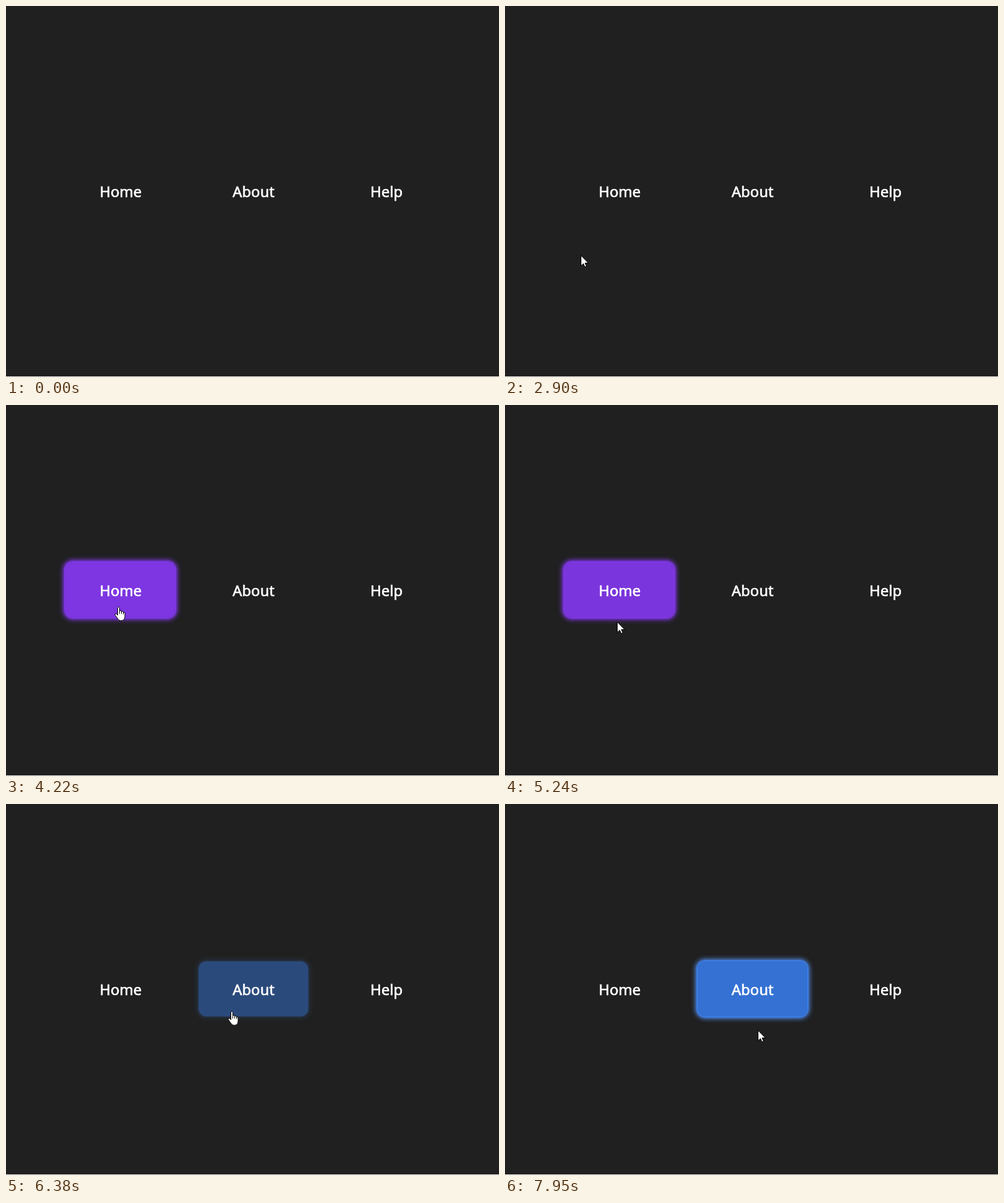
An HTML page for the animation above (8000 ms loop, 788x594 px).

```html
<!DOCTYPE html>
<html lang="en">
<head>
<meta charset="utf-8">
<title>Hover menu</title>
<style>
  html, body { margin: 0; width: 100%; height: 100%; overflow: hidden; background: #202020; }
  body { position: relative; }
  .item {
    position: absolute; top: 252px; width: 175px; height: 88px; border-radius: 12px;
    font: 23.5px/88px "Noto Sans", "Open Sans", sans-serif; letter-spacing: .1px;
    text-align: center; color: #fff; -webkit-text-stroke: .7px #fff;
  }
  .item span { position: relative; left: .8px; top: 1px; }
  #edge { position: absolute; left: 0; top: 593px; width: 788px; height: 1px; background: #e8e8e8; }
  svg { position: absolute; left: 0; top: 0; }
  #pointer path { stroke: #000; stroke-linejoin: round; fill: #fff; }
</style>
</head>
<body>
<div class="item" style="left:95px"><span>Home</span></div>
<div class="item" style="left:307.5px"><span>About</span></div>
<div class="item" style="left:520px"><span>Help</span></div>
<div id="edge"></div>
<svg width="788" height="594">
  <g id="pointer">
    <path id="arrow" d="M0 0V16.5L3.8 13 6.2 18.3 8.7 17.2 6.4 12H11.6Z"/>
    <g id="hand" transform="translate(-6 0)">
      <path d="M5 2Q6.5-.8 8 2V7.5Q9.5 5.8 11 7.5V8.5Q12.5 7 14 8.7V9.5Q16.5 8.8 16.5 11V16Q16.5 22.8 10 22.8 7 22.8 5 19.5L1 14Q-.2 11 2.5 11.5L5 14Z"/>
      <path d="M8 7.5V12M11 8V12M14 9.5V12.5" style="fill:none"/>
    </g>
  </g>
</svg>
<script>
const LOOP = 8000, FADE = 700;
const [home, about] = document.querySelectorAll('.item');
const pointer = document.getElementById('pointer');
const arrow = document.getElementById('arrow');
const hand = document.getElementById('hand');

const hovers = [
  { item: home, enter: 3725, leave: 5180, fill: '131,56,236', glow: '131,56,236' },
  { item: about, enter: 6205, leave: 7843, fill: '58,134,255', glow: '90,153,255' }
];

// Each move bends toward a control point and starts where the previous one ended.
const origin = [22, 592];
const moves = [
  { from: 1400, to: 1880, bend: [59, 545], end: [96, 499] },
  { from: 2280, to: 3040, bend: [80, 408], end: [142, 390] },
  { from: 3110, to: 3880, bend: [165, 370], end: [180, 322] },
  { from: 4750, to: 5500, bend: [161, 349], end: [200, 353] },
  { from: 5570, to: 6310, bend: [353, 362], end: [361, 331] },
  { from: 6380, to: 6800, bend: [367, 325], end: [373, 320] },
  { from: 7680, to: 7950, bend: [388, 332], end: [405, 362] }
];

const clamp = v => Math.min(1, Math.max(0, v));
const smooth = (a, b, v) => { const u = clamp((v - a) / (b - a)); return u * u * (3 - 2 * u); };

// CSS "ease": cubic-bezier(.25, .1, .25, 1)
function ease(x) {
  x = clamp(x);
  const bezier = (p1, p2, s) => 3 * p1 * s * (1 - s) ** 2 + 3 * p2 * s * s * (1 - s) + s ** 3;
  let low = 0, high = 1;
  for (let i = 0; i < 20; i++) {
    const mid = (low + high) / 2;
    if (bezier(.25, .25, mid) < x) low = mid; else high = mid;
  }
  return bezier(.1, 1, low);
}

function pointerAt(t) {
  let place = origin;
  for (const { from, to, bend, end } of moves) {
    if (t < from) break;
    const u = clamp((t - from) / (to - from)), v = 1 - u;
    place = place.map((p, i) => v * v * p + 2 * u * v * bend[i] + u * u * end[i]);
  }
  return place.map(Math.round);
}

function drawHover({ item, enter, leave, fill, glow }, t) {
  const level = ease((t - enter) / FADE) - ease((t - leave) / FADE);
  const halo = level * smooth(.2, .85, level);
  item.style.background = `rgba(${fill},${level})`;
  item.style.boxShadow = `0 0 2px 2px rgba(${fill},${halo}), 0 0 7px 4px rgba(${glow},${halo})`;
}

function drawPointer(t) {
  const [x, y] = pointerAt(t);
  const over = hovers.some(h => t >= h.enter && t < h.leave);
  pointer.style.display = t < moves[0].from ? 'none' : '';
  pointer.setAttribute('transform', `translate(${x - .5} ${y + .5})`);
  arrow.style.display = over ? 'none' : '';
  hand.style.display = over ? '' : 'none';
}

const start = performance.now();
function tick() {
  const t = (performance.now() - start) % LOOP;
  hovers.forEach(h => drawHover(h, t));
  drawPointer(t);
  requestAnimationFrame(tick);
}
tick();
</script>
</body>
</html>
```
